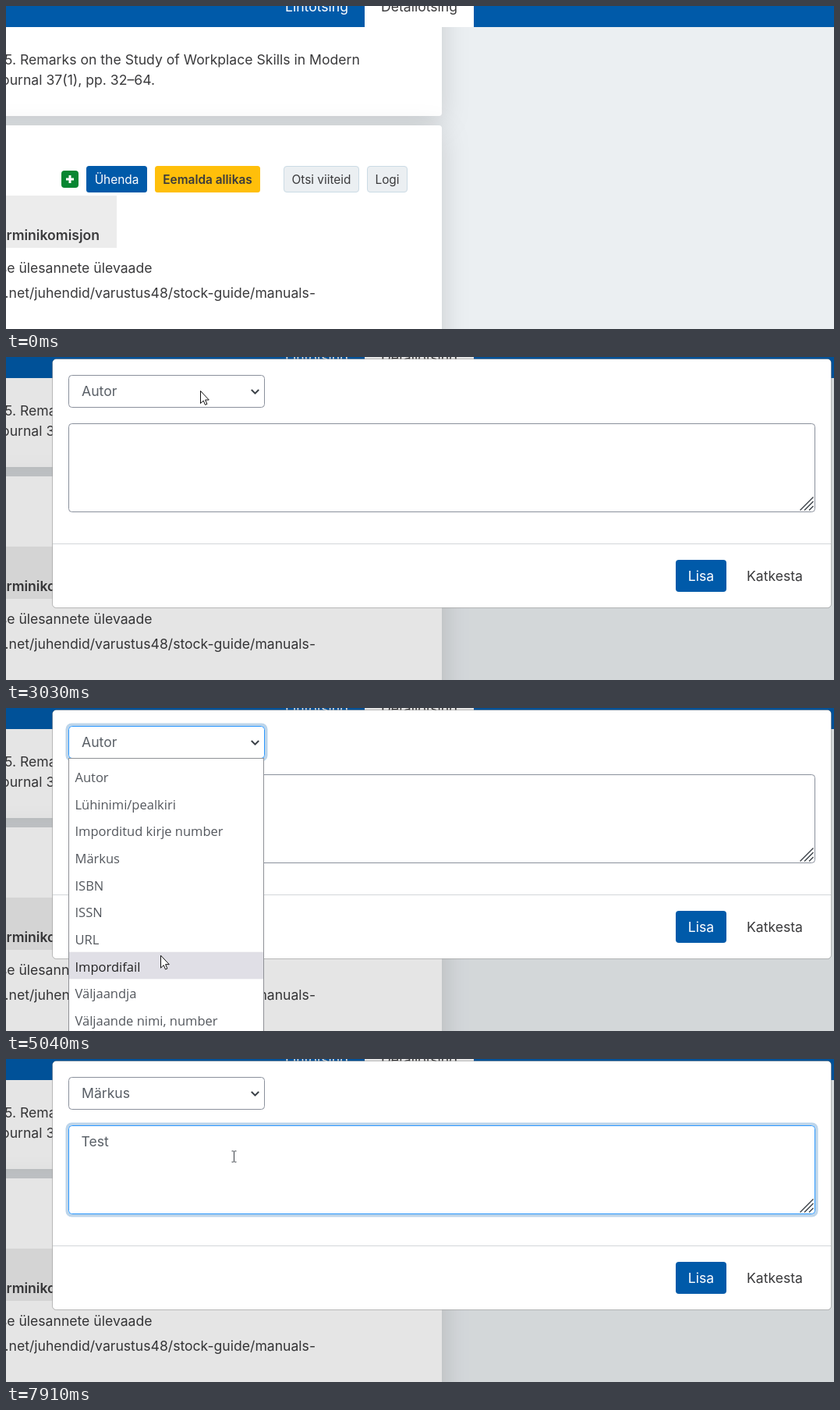
Animation of 1062x414 px, one loop 8000 ms. Source, as an HTML page:

```html
<!DOCTYPE html>
<html lang="et">
<head>
<meta charset="utf-8">
<title>Allika lisamine</title>
<style>
  html, body { margin: 0; height: 100%; overflow: hidden; background: #ebeff2; }
  svg { display: block; width: 100%; height: 100%; font: 17.6px Inter, sans-serif; fill: #3a3a3c; }
  .card { fill: #fff; filter: drop-shadow(0 8.8px 17.6px rgba(0, 0, 0, .15)); }
  .blue { fill: #005aa9; }
  .white { fill: #fff; }
  .end { text-anchor: end; }
  .mid { text-anchor: middle; }
  .small { font-size: 15.4px; text-anchor: middle; }
  .bold { font-weight: 600; }
  .soft { fill: #ebeff2; stroke: #cbdbe5; }
  .field { fill: #fff; stroke: #8a909c; }
  .value { fill: #595f66; }
  .ring { fill: none; stroke: #bdd5ea; stroke-width: 3.5; }
  .focus .field { stroke: #2a97ff; }
  .ring { display: none; }
  .focus .ring { display: inline; }
  .line { fill: none; stroke: #3a4047; }
  #list text { font: 16.5px "Open Sans", "Noto Sans", sans-serif; fill: #53575d; }
  #list text.on { fill: #222; }
</style>
</head>
<body>
<svg viewBox="0 0 1062 414">
  <rect width="1062" height="414" fill="#ebeff2"/>
  <rect class="card" x="-80" y="-50" width="639" height="191" rx="4"/>
  <rect class="card" x="-80" y="153" width="639" height="400" rx="4"/>
  <rect class="blue" width="1062" height="27"/>
  <rect class="white" x="460" width="140" height="27"/>
  <text class="white mid" x="398.5" y="7">Lihtotsing</text>
  <text class="mid" x="530" y="7">Detailotsing</text>

  <text x="-2" y="75">5. Remarks on the Study of Workplace Skills in Modern</text>
  <text class="end" x="191" y="101">Journal 37(1), pp. 32–64.</text>
  <rect y="243" width="142" height="67" fill="#ececec"/>
  <text class="end bold" x="120" y="300">Terminikomisjon</text>
  <text class="end" x="187.5" y="342">se ülesannete ülevaade</text>
  <text class="end" x="397" y="374">.net/juhendid/varustus48/stock-guide/manuals-</text>

  <g id="add">
    <rect class="ring" x="69.2" y="209.2" width="25.6" height="25.6" rx="5.5"/>
    <rect x="71" y="211" width="22" height="22" rx="4" fill="#088632"/>
    <path id="plus" d="M77 222h10M82 217v10" stroke="#fff" stroke-width="3"/>
  </g>
  <rect class="blue" x="103" y="205" width="78" height="34" rx="3.5"/>
  <text class="small white" x="142" y="227.5">Ühenda</text>
  <rect x="191" y="205" width="135" height="34" rx="3.5" fill="#ffbf0a"/>
  <text class="small bold" x="258.5" y="227.5">Eemalda allikas</text>
  <rect class="soft" x="356.5" y="205.5" width="96" height="33" rx="3.5"/>
  <text class="small" x="404.5" y="227.5">Otsi viiteid</text>
  <rect class="soft" x="463.5" y="205.5" width="51" height="33" rx="3.5"/>
  <text class="small" x="489" y="227.5">Logi</text>

  <g id="modal">
    <rect width="1062" height="414" opacity=".1" fill="#000"/>
    <rect x="59.5" y="2.5" width="999" height="319" rx="5" fill="#fff" stroke="#000" stroke-opacity=".24"/>
    <path d="M60 239.5h998" stroke="#d3d7da"/>
    <g id="select">
      <rect class="ring" x="78.2" y="21.2" width="255.6" height="45.6" rx="6"/>
      <rect class="field" x="80.5" y="23.5" width="251" height="41" rx="4"/>
      <text class="value" id="choice" x="97" y="50"></text>
      <path class="line" stroke-width="2" d="M314.8 42l4.7 4.7 4.7-4.7"/>
    </g>
    <g id="area">
      <rect class="ring" x="78.2" y="83.2" width="961.6" height="117.6" rx="6"/>
      <rect class="field" x="80.5" y="85.5" width="957" height="113" rx="4"/>
      <path class="line" stroke-width="1.4" d="M1018.500 196.500l17-17M1024 196.500l11.500-11.500M1030 196.500l5.500-5.500"/>
      <text class="value" id="note" x="96.500" y="112"></text>
      <rect id="caret" y="95" width="1" height="21"/>
    </g>
    <rect class="blue" x="859" y="260" width="65" height="41" rx="4"/>
    <text class="white mid" x="891.5" y="287">Lisa</text>
    <text class="mid" x="986" y="287">Katkesta</text>
  </g>

  <g id="list">
    <rect x="80.5" y="64.5" width="250" height="400" fill="#fff" stroke="#8f9196"/>
    <rect id="mark" x="81" width="249" height="34.67" fill="#e0dfe6"/>
  </g>
  <circle id="press" r="15" fill="#ff0" opacity=".5"/>
  <path id="arrow" d="M.5.5V16.500L4.200 13 6.500 18.300 8.900 17.300 6.600 12H11.300Z" fill="#fff" stroke="#111"/>
  <path id="beam" class="line" d="M-3-7h2.200L0-6.300.8-7H3M0-6.500v13M-3 7h2.200L0 6.300.8 7H3"/>
</svg>
<script>
const LOOP = 8000, ROW = 34.67, TOP = 70;
const $ = id => document.getElementById(id);
const options = ['Autor', 'Lühinimi/pealkiri', 'Imporditud kirje number', 'Märkus', 'ISBN', 'ISSN',
  'URL', 'Impordifail', 'Väljaandja', 'Väljaande nimi, number'];

const items = options.map((label, i) => {
  const item = document.createElementNS('http://www.w3.org/2000/svg', 'text');
  item.textContent = label;
  item.setAttribute('x', 88.5);
  item.setAttribute('y', 95 + i * ROW);
  return $('list').appendChild(item);
});

// Pointer path: time, x, y
const path = [
  [70, 525, 388], [470, 107, 243], [670, 107, 243], [890, 155, 304], [1180, 73, 217], [1360, 79, 227],
  [2500, 79, 227], [2830, 249, 43], [3690, 249, 43], [4090, 200, 317], [4490, 198, 374], [4560, 198, 374],
  [4620, 198, 379], [4900, 198, 379], [5040, 198, 317], [5450, 198, 198], [5980, 198, 198],
  [6190, 292, 125], [LOOP, 292, 125]
];

const slope = (i, k) => path[i] && path[i + 1]
  ? (path[i + 1][k] - path[i][k]) / (path[i + 1][0] - path[i][0]) : 0;

// Tangent that never overshoots a waypoint
function tangent(i, k) {
  const a = slope(i - 1, k), b = slope(i, k);
  return a * b > 0 ? 2 * a * b / (a + b) : 0;
}

function pointer(t, k) {
  t = Math.max(t, path[0][0]);
  const i = Math.max(0, path.findIndex(p => p[0] > t) - 1);
  const p = path[i], q = path[i + 1], d = q[0] - p[0], s = (t - p[0]) / d, r = 1 - s;
  return p[k] * (1 + 2 * s) * r * r + q[k] * s * s * (3 - 2 * s)
    + d * s * r * (tangent(i, k) * r - tangent(i + 1, k) * s);
}

const show = (id, on) => { $(id).style.display = on ? 'inline' : 'none'; };
const focus = (id, on) => $(id).classList.toggle('focus', on);
const place = (id, x, y) => $(id).setAttribute('transform', `translate(${x} ${y})`);

function draw(t) {
  const within = (a, b) => t >= a && t < b;
  const x = pointer(t, 1), y = pointer(t, 2);

  focus('add', t >= 1840);
  $('plus').setAttribute('stroke', t > 670 && x > 71 && x < 93 && y > 211 && y < 233 ? '#2f4a38' : '#fff');

  show('modal', t >= 1980);
  focus('select', within(3160, 6320));
  focus('area', t >= 6320);
  $('choice').textContent = options[t < 5980 ? 0 : 3];

  show('list', within(3160, 5780));
  const row = Math.max(0, Math.floor((pointer(t - 35, 2) - TOP) / ROW));
  $('mark').setAttribute('y', TOP + row * ROW);
  items.forEach((item, i) => item.classList.toggle('on', i === row));

  const typed = [7310, 7580, 7690, 7800].filter(k => t >= k).length;
  $('note').textContent = 'Test'.slice(0, typed);
  show('caret', within(6320, 6850) || within(7380, 7910));
  $('caret').setAttribute('x', Math.round(96 + (typed && $('note').getComputedTextLength())));

  show('press', within(1760, 1840) || within(2970, 3030) || within(5710, 5780) || within(6240, 6320));
  place('press', x - 2, y - 1);
  show('arrow', within(70, 5981));
  place('arrow', x, y);
  show('beam', t >= 5981);
  place('beam', x + .5, y);
}

const start = performance.now();
function tick() {
  draw((performance.now() - start) % LOOP);
  requestAnimationFrame(tick);
}
tick();
</script>
</body>
</html>
```
